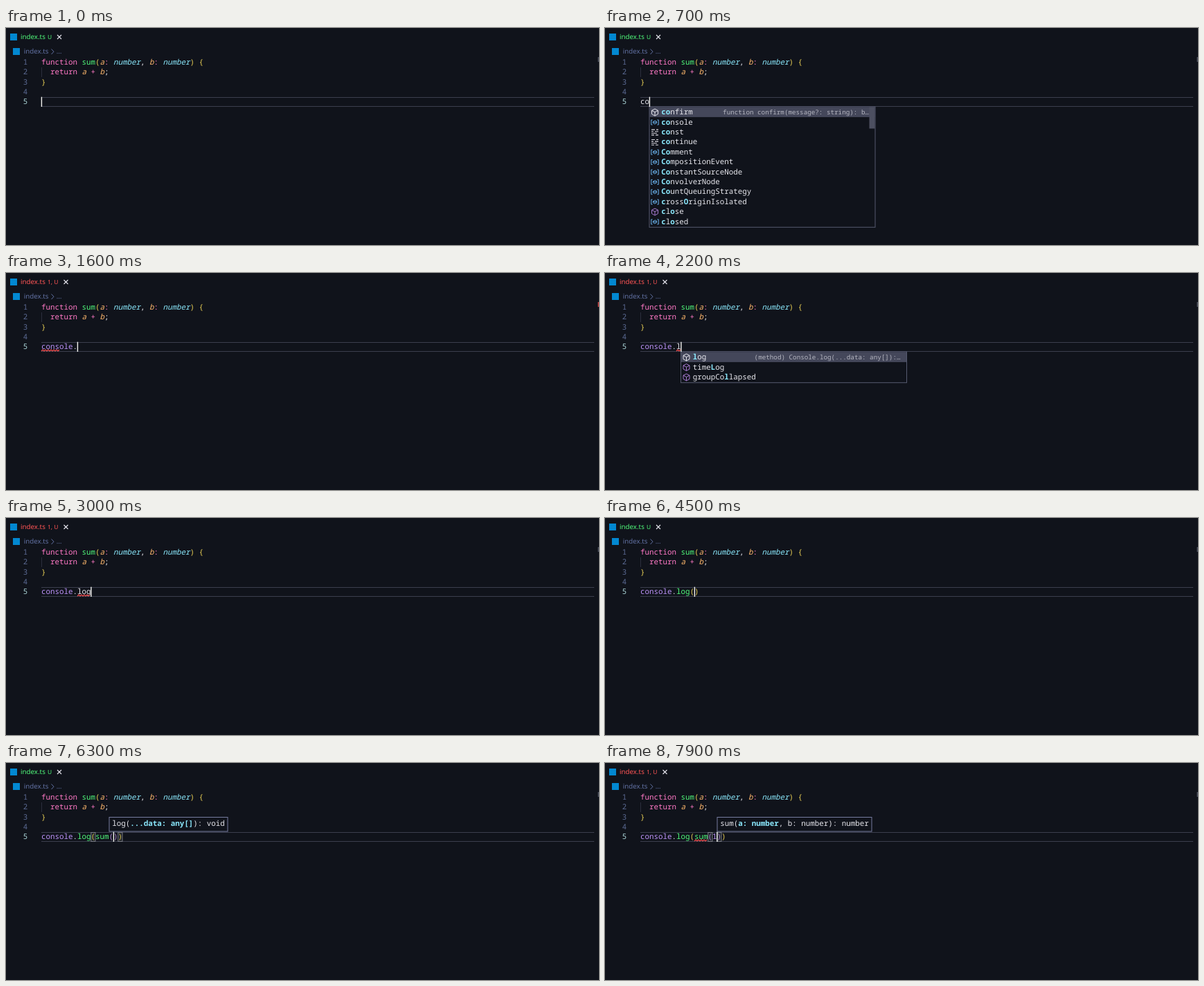
These frames come from a looping animation (856x314 px, 8000 ms). An HTML page:

```html
<!DOCTYPE html>
<html lang="en">
<head>
<meta charset="utf-8">
<title>Typing in a code editor</title>
<style>
  html, body { margin: 0; width: 100%; height: 100%; overflow: hidden; background: #10131b; }
  svg { display: block; width: 100%; height: 100%; }
  text { font: 10.833px "Noto Sans Mono", "DejaVu Sans Mono", monospace; fill: #e8e8ee; text-rendering: geometricPrecision; white-space: pre; }
  text.ui { font: 9.75px "Noto Sans", "Open Sans", sans-serif; }
  text.badge { font-size: 8.4px; }
  text.detail { font-size: 9.25px; fill: #b4b5c0; }
  text.key { fill: #ff79c6; }
  text.fn { fill: #50fa7b; }
  text.arg { fill: #ffb86c; font-style: italic; }
  text.type { fill: #8be9fd; font-style: italic; }
  text.obj { fill: #bd93f9; }
  text.b1 { fill: #e8cf55; }
  text.b2 { fill: #b58ad8; }
  text.hit { fill: #8be9fd; font-weight: 700; }
  text.old { fill: #8e909c; text-decoration: line-through; }
  text.num { fill: #5b6a93; text-anchor: end; }
  text.now { fill: #a8d2d4; }
</style>
</head>
<body>
<svg id="stage" viewBox="0 0 856 314" preserveAspectRatio="none"></svg>
<script>
const LOOP = 8000, X = 51, CW = 6.5, ROW = 14.4, TOP = 114.5;
const stage = document.getElementById('stage');
const at = col => X + col * CW;

// Completion lists: m method, v variable, k keyword, o deprecated variable
const coList = 'm confirm|v console|k const|k continue|v Comment|v CompositionEvent|v ConstantSourceNode|v ConvolverNode|v CountQueuingStrategy|v crossOriginIsolated|m close|v closed';
const conList = 'm confirm|v console|k const|k continue|v ConstantSourceNode|v ConvolverNode|v CountQueuingStrategy|v crossOriginIsolated';
const consList = 'v console|k const|v ConstantSourceNode|v CountQueuingStrategy|v crossOriginIsolated';
const memberList = 'm assert|m clear|m count|m countReset|m debug|m dir|m dirxml|m error|m group|m groupCollapsed|m groupEnd|m info';
const logList = 'm log|m timeLog|m groupCollapsed';
const suList = 'm sum|k super|v SubmitEvent|v SubtleCrypto|v SVGUnitTypes|v SVGUseElement|v PushSubscription|v PushSubscriptionOptions|v SourceBuffer|v SourceBufferList|v statusbar|o status';
const sumList = 'm sum|v SubmitEvent|v SVGNumber|v SVGNumberList|v SVGAnimatedNumber';

const confirmSig = 'function confirm(message?: string): b…';
const logSig = '(method) Console.log(...data: any[]):…';
const sumSig = 'function sum(a: number, b: number): n…';
const menu = (col, query, list, detail) => ({ col, query, list, detail });

const logHint = [['log('], ['...data: any[]', 'hit'], ['): void']];
const sumHint = [['sum('], ['a: number', 'hit'], [', b: number): number']];

const plain = s => [[s]];
const member = s => [['console', 'obj'], ['.'], [s]];
const call = (...inner) => [['console', 'obj'], ['.'], ['log', 'fn'], ['(', 'b1'], ...inner, [')', 'b1']];
const nested = (...inner) => call(['sum', 'fn'], ['(', 'b2'], ...inner, [')', 'b2']);

// Each step overrides part of the state; key marks a keystroke, which restarts the blink
const steps = [
  [0, { key: 1, line: [], col: 0, menu: null, hint: null, boxes: [], wave: null, error: false, mark: false }],
  [300, { key: 1, line: plain('c'), col: 1 }],
  [400, { menu: menu(1, 'c', coList, confirmSig) }],
  [500, { key: 1, line: plain('co'), col: 2, menu: menu(2, 'co', coList, confirmSig) }],
  [900, { key: 1, line: plain('con'), col: 3, menu: menu(3, 'con', conList, confirmSig) }],
  [1100, { key: 1, line: plain('cons'), col: 4, menu: menu(4, 'cons', consList, 'var console: Console') }],
  [1300, { error: true, mark: true, wave: [0, 4] }],
  [1400, { key: 1, line: [['console', 'obj']], col: 7, menu: null }],
  [1600, { key: 1, line: member(''), col: 8 }],
  [1700, { menu: menu(8, '', memberList, '(method) Console.assert(condition?: b…') }],
  [1900, { wave: [7, 8], mark: false }],
  [2200, { key: 1, line: member('l'), col: 9, wave: [8, 9], menu: menu(9, 'l', logList, logSig) }],
  [2400, { key: 1, line: member('lo'), col: 10, wave: [8, 10], menu: menu(10, 'lo', logList, logSig) }],
  [3000, { key: 1, line: member('log'), col: 11, wave: [8, 11], menu: null }],
  [3300, { error: false, wave: null }],
  [4500, { key: 1, line: call(), col: 12 }],
  [4600, { hint: [12, logHint], boxes: [11, 12] }],
  [5000, { key: 1, line: call(['s']), col: 13, hint: [13, logHint], boxes: [11, 13] }],
  [5100, { menu: menu(13, 's', suList, sumSig) }],
  [5200, { key: 1, line: call(['su']), col: 14, hint: [14, logHint], boxes: [11, 14], menu: menu(14, 'su', suList, sumSig) }],
  [5400, { key: 1, line: call(['sum']), col: 15, hint: [15, logHint], boxes: [11, 15], menu: menu(15, 'sum', sumList, sumSig) }],
  [5700, { line: call(['sum', 'fn']) }],
  [6300, { key: 1, line: nested(), col: 16, boxes: [11, 17], menu: null }],
  [6400, { boxes: [15, 16] }],
  [6500, { hint: [16, sumHint] }],
  [6700, { key: 1, line: nested(['1', 'obj']), col: 17, boxes: [15, 17], hint: [17, sumHint] }],
  [7000, { error: true, wave: [12, 15] }]
];

const text = (x, y, s, cls = '') => `<text x="${x}" y="${y}" class="${cls}">${s}</text>`;
const rect = (x, y, w, h, fill, stroke = 'none') =>
  `<rect x="${x}" y="${y}" width="${w}" height="${h}" fill="${fill}" stroke="${stroke}"/>`;
const path = (d, stroke, width = 1) => `<path d="${d}" fill="none" stroke="${stroke}" stroke-width="${width}"/>`;

// Places every word on the character grid
function code(x, y, tokens) {
  let col = 0, out = '';
  for (const [s, cls] of tokens) {
    for (const m of s.matchAll(/\S+/g)) out += text(x + (col + m.index) * CW, y, m[0], cls);
    col += s.length;
  }
  return out;
}

function hits(word, query) {
  const low = word.toLowerCase(), run = low.indexOf(query);
  if (run >= 0) return [...query].map((_, i) => run + i);
  const found = [];
  let from = 0;
  for (const ch of query) {
    let i = word.indexOf(ch.toUpperCase(), from);
    if (i < 0) i = low.indexOf(ch, from);
    if (i < 0) break;
    found.push(i);
    from = i + 1;
  }
  return found;
}

function label(word, query, cls) {
  const on = hits(word, query), tokens = [];
  [...word].forEach((ch, i) => {
    const c = cls || (on.includes(i) ? 'hit' : ''), last = tokens[tokens.length - 1];
    if (last && last[1] === c) last[0] += ch;
    else tokens.push([ch, c]);
  });
  return tokens;
}

function icon(kind, x, y, selected) {
  const shape = {
    m: () => path('M0-5L4.5-2.7V2.5L0 5L-4.5 2.5V-2.7ZM-4.5-2.7L0-.4L4.5-2.7M0-.4V5', selected ? '#e6e6ee' : '#a679cf'),
    k: () => path('M-5-3.8H0M2-3.8H5M-5-1.2H-2M0-1.2H5M-5 1.4H3M-5 4H-1M1 4H5', '#dcdce4', 1.1),
    v: () => path('M-3.5-3.5H-5.2V3.5H-3.5M3.5-3.5H5.2V3.5H3.5M-2.6-.8L.4-2.4L2.6-1V1L-.4 2.4L-2.6 1ZM-2.6-.8L-.2.3L2.6-1', '#6cb4ee')
  };
  return `<g transform="translate(${x} ${y})">${(shape[kind] || shape.v)()}</g>`;
}

function drawMenu({ col, query, list, detail }) {
  const x = at(col), rows = list.split('|');
  let out = rect(x, TOP - .5, 326, rows.length * ROW + 1.5, '#10131b', '#565a70');
  out += rect(x + .5, TOP, 325, ROW, '#44475a');
  if (rows.length > 11) out += rect(x + 317.5, TOP, 8, 31, '#4c4f60');
  rows.forEach((row, i) => {
    const [kind, word] = row.split(' '), y = TOP + i * ROW;
    out += icon(kind, x + 8, y + 7.6, i === 0);
    out += code(x + 17.2, y + 10.6, label(word, query, kind === 'o' ? 'old' : ''));
  });
  return out + text(x + 317 - detail.length * 5.55, TOP + 10.2, detail, 'detail');
}

function drawHint([col, tokens]) {
  const x = at(col), n = tokens.reduce((sum, [s]) => sum + s.length, 0);
  return rect(x + .5, 78.5, n * CW + 8.5, 20.5, '#10131b', '#777ca0') + code(x + 4.7, 91.4, tokens);
}

function drawWave([a, b]) {
  let d = `M${at(a)} 113`;
  for (let x = at(a) + 2, up = true; x <= at(b); x += 2, up = !up) d += `L${x} ${up ? 111 : 113}`;
  return path(d, '#ff4f4f', 1.1);
}

function drawTab(error) {
  const color = error ? '#ff5555' : '#50fa7b', x = error ? 86.5 : 77;
  return `<g style="--c:${color}">` +
    rect(6, 8, 10, 10, '#0288d1') + rect(10, 29, 10, 10, '#0288d1') +
    `<text x="21" y="16.4" class="ui" style="fill:var(--c)">index.ts</text>` +
    `<text x="60" y="16.2" class="ui badge" style="fill:var(--c)">${error ? '1, U' : 'U'}</text></g>` +
    path(`M${x - 3} 10L${x + 3} 16M${x + 3} 10L${x - 3} 16`, '#e6e6ee', 1.1) +
    `<text x="25.7" y="37.4" class="ui" style="fill:#6272a4">index.ts</text>` +
    path('M65.5 30.5L69 34.2L65.5 38', '#6272a4') +
    `<text x="72.8" y="37.4" class="ui" style="fill:#6272a4">…</text>`;
}

const baseline = n => 52.7 + (n - 1) * ROW;

const fixedLines = [
  [['function ', 'key'], ['sum', 'fn'], ['(', 'b1'], ['a', 'arg'], [': ', 'key'], ['number', 'type'], [', '],
   ['b', 'arg'], [': ', 'key'], ['number', 'type'], [') {', 'b1']],
  [['  return ', 'key'], ['a', 'arg'], [' + ', 'key'], ['b', 'arg'], [';']],
  [['}', 'b1']]
];

function draw(s, cursorOn) {
  let out = rect(0, 0, 856, 314, '#10131b') + drawTab(s.error);
  for (let n = 1; n <= 5; n++) out += text(31.2, baseline(n), n, n === 5 ? 'num now' : 'num');
  out += path('M51.5 57V71', '#2b2f3d');
  out += path('M51 100.5H849M51 113.5H849', '#3c3f4e');
  out += path('M855.2 42V49', s.mark ? '#d84a4a' : '#555966', 1.4);
  fixedLines.forEach((line, i) => out += code(X, baseline(i + 1), line));
  for (const col of s.boxes) out += rect(at(col) + .3, 100.5, CW - .4, 13, '#1b2027', '#7d7f88');
  out += code(X, baseline(5), s.line);
  if (s.wave) out += drawWave(s.wave);
  if (s.hint) out += drawHint(s.hint);
  if (s.menu) out += drawMenu(s.menu);
  if (cursorOn) out += rect(at(s.col) - .3, 99.7, 1.4, 14.3, '#f4f4f0');
  stage.innerHTML = out;
}

let shown = '';
function render(t) {
  const state = {};
  let lastKey = 0, count = 0;
  for (const [time, change] of steps) {
    if (time > t) break;
    Object.assign(state, change);
    if (change.key) lastKey = time;
    count++;
  }
  const cursorOn = Math.floor((t - lastKey) / 500) % 2 === 0;
  const id = count + ':' + cursorOn;
  if (id === shown) return;
  shown = id;
  draw(state, cursorOn);
}

const start = performance.now();
function tick() {
  render((performance.now() - start) % LOOP);
  requestAnimationFrame(tick);
}
tick();
</script>
</body>
</html>
```
